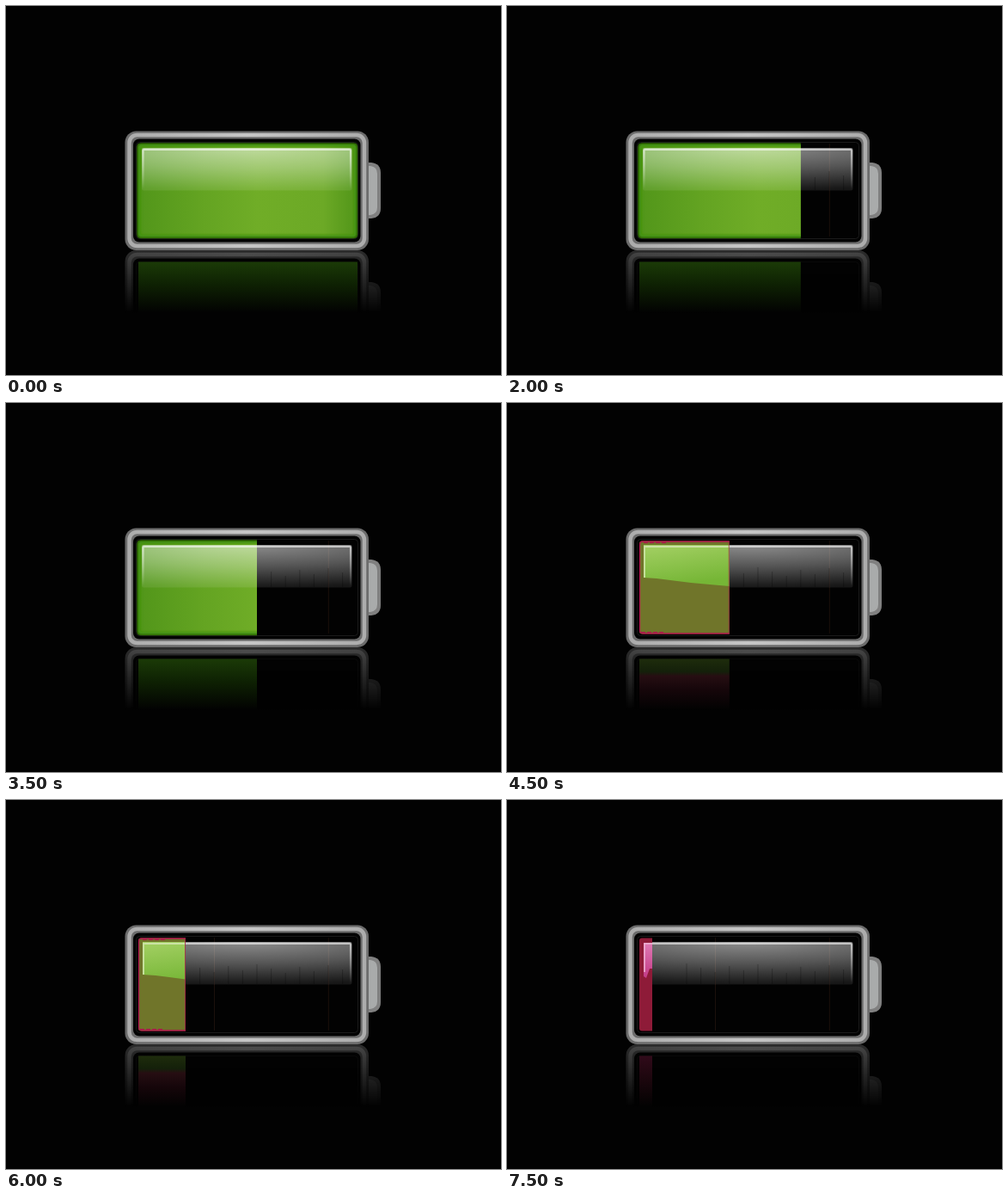
These frames come from a looping animation (576 by 429 pixels, 8 s). An HTML page:

```html
<!DOCTYPE html>
<html>
<head>
<meta charset="utf-8">
<style>
html, body { margin: 0; width: 100%; height: 100%; overflow: hidden; background: #020202; }
svg { display: block; width: 576px; height: 429px; }
</style>
</head>
<body>
<svg viewBox="0 0 576 429">
  <defs>
    <linearGradient id="green">
      <stop offset="0" stop-color="#52961a"/><stop offset=".3" stop-color="#64a422"/>
      <stop offset=".55" stop-color="#70ad27"/><stop offset=".85" stop-color="#6ca926"/>
      <stop offset="1" stop-color="#529619"/>
    </linearGradient>
    <linearGradient id="metal">
      <stop offset="0" stop-color="#acacac"/><stop offset=".5" stop-color="#c6c6c6"/><stop offset="1" stop-color="#acacac"/>
    </linearGradient>
    <radialGradient id="gloss" cx=".5" cy="0" r="1" gradientTransform="translate(-.3 0) scale(1.6 1)">
      <stop offset="0" stop-color="#fff" stop-opacity=".55"/>
      <stop offset=".5" stop-color="#fff" stop-opacity=".33"/>
      <stop offset="1" stop-color="#fff" stop-opacity=".08"/>
    </radialGradient>
    <linearGradient id="rim" x2="0" y2="1">
      <stop offset="0" stop-color="#fff" stop-opacity=".6"/>
      <stop offset="1" stop-color="#fff" stop-opacity="0"/>
    </linearGradient>
    <linearGradient id="lime" x2=".3" y2="1">
      <stop offset="0" stop-color="#a4d064"/><stop offset="1" stop-color="#76b636"/>
    </linearGradient>
    <linearGradient id="pink" x2="0" y2="1">
      <stop offset="0" stop-color="#e07ab4"/><stop offset="1" stop-color="#c23a86"/>
    </linearGradient>
    <linearGradient id="mirrorGreen" x2="0" y2="1">
      <stop offset="0" stop-color="#1b3a07"/><stop offset=".45" stop-color="#0e2103"/><stop offset="1" stop-color="#020202"/>
    </linearGradient>
    <linearGradient id="mirrorOlive" x2="0" y2="1">
      <stop offset="0" stop-color="#1e2c0c"/><stop offset=".25" stop-color="#14200a"/>
      <stop offset=".34" stop-color="#260e12"/><stop offset=".6" stop-color="#16060a"/><stop offset="1" stop-color="#020202"/>
    </linearGradient>
    <linearGradient id="mirrorRed" x2="0" y2="1">
      <stop offset="0" stop-color="#300a1a"/><stop offset=".5" stop-color="#1a060c"/><stop offset="1" stop-color="#020202"/>
    </linearGradient>
    <linearGradient id="fade" gradientUnits="userSpaceOnUse" x1="0" x2="0" y1="284" y2="357">
      <stop offset="0" stop-color="#fff" stop-opacity=".4"/><stop offset="1" stop-color="#fff" stop-opacity="0"/>
    </linearGradient>
    <mask id="fadeMask" maskUnits="userSpaceOnUse" x="130" y="284" width="320" height="80">
      <rect x="130" y="284" width="320" height="80" fill="url(#fade)"/>
    </mask>
    <filter id="soft"><feGaussianBlur stdDeviation=".7"/></filter>
    <filter id="glow"><feGaussianBlur stdDeviation="1.4"/></filter>
    <clipPath id="level"><rect id="levelBox" x="150" y="150" height="210"/></clipPath>
    <g id="shell">
      <path d="M415 182h10q11 1 11 12v41q0 11-11 12h-10z" fill="#808080" filter="url(#soft)"/>
      <path d="M415 186h9q8 1 8 9v39q0 8-8 9h-9z" fill="#a9abab" filter="url(#soft)"/>
      <g filter="url(#soft)">
        <rect x="138.500" y="145.500" width="283.500" height="138.500" rx="13" fill="#6c6c6c"/>
        <rect x="143.500" y="150" width="273.500" height="129" rx="9" fill="none" stroke="url(#metal)" stroke-width="4.500"/>
        <rect x="148" y="154.500" width="264.500" height="120" rx="7" fill="#020202"/>
      </g>
      <rect x="151.500" y="158.500" width="258" height="112" rx="4" fill="none" stroke="#1a1a1a"/>
    </g>
  </defs>

  <g mask="url(#fadeMask)"><use href="#shell" transform="matrix(1 0 0 -1 0 568)"/></g>
  <use href="#shell"/>
  <g id="stains" stroke="#22150f" stroke-width=".8"></g>

  <g class="mode" clip-path="url(#level)">
    <rect x="154" y="297.500" width="255" height="59" fill="url(#mirrorGreen)"/>
    <rect x="152.500" y="159.500" width="256.500" height="110.500" rx="4" fill="#2c6206" filter="url(#soft)"/>
    <rect x="154.500" y="161.500" width="252.500" height="106.500" rx="3" fill="url(#green)"/>
    <rect x="155" y="162" width="251.500" height="105.500" rx="3" fill="none" stroke="#3f920b" stroke-width="3" filter="url(#glow)"/>
  </g>

  <rect x="158" y="165" width="244.500" height="49.500" rx="2" fill="url(#gloss)"/>
  <rect x="159.500" y="166.800" width="241.500" height="47" rx="1.500" fill="none" stroke="url(#rim)" stroke-width="2.200" filter="url(#soft)"/>
  <g id="streaks" stroke="#000" stroke-opacity=".25"></g>

  <g class="mode" clip-path="url(#level)">
    <rect x="154" y="297.500" width="255" height="59" fill="url(#mirrorOlive)"/>
    <rect x="154" y="160.500" width="255" height="108" rx="3" fill="#70752a"/>
    <path d="M159 165H260V213L236 211 214 209 190 206 174 204 159 203z" fill="url(#lime)"/>
    <path d="M160 203V167H260" fill="none" stroke="#cbe3a4" stroke-width="1.800" filter="url(#soft)"/>
    <path d="M260 161H158Q154.500 161 154.500 165V264Q154.500 268 158 268H260" fill="none" stroke="#b0164e" stroke-width="1.300"/>
    <path d="M159 162.500H186M156 266.500H184" stroke="#b0164e" stroke-dasharray="5 2"/>
    <path id="edge" d="M0 161V268" stroke="#a31c46" stroke-opacity=".8"/>
  </g>
  <g class="mode" clip-path="url(#level)">
    <rect x="154" y="297.500" width="255" height="59" fill="url(#mirrorRed)"/>
    <rect x="154" y="160.500" width="255" height="108" rx="3" fill="#8e1b38"/>
    <path d="M159 166H196V196H166L162 207 159 205z" fill="url(#pink)"/>
    <path d="M160 200V167H196" fill="none" stroke="#f0b4d4" stroke-width="1.500" filter="url(#soft)"/>
  </g>
</svg>
<script>
const STEP = 500, STEPS = 16;
const $ = id => document.getElementById(id);
const modes = [...document.querySelectorAll('.mode')];
const edgeAt = i => i === 0 ? 411 : i < 13 ? 408.2 - 16.6 * i : 193 - 12 * (i - 13);
const modeAt = i => i < 9 ? 0 : i < 13 ? 1 : 2;
const line = (x, top, bottom) => `<path d="M${x} ${top}V${bottom}"/>`;
let shown = -1;

function draw(i) {
  const edge = edgeAt(i), mode = modeAt(i);
  $('levelBox').setAttribute('width', edge - 150);
  $('edge').setAttribute('transform', `translate(${edge - 0.5})`);
  modes.forEach((m, k) => m.style.display = k === mode ? '' : 'none');

  // Faint traces stay where earlier level edges stood.
  let streaks = '';
  for (let k = 1; k < Math.min(i, 13); k++) {
    streaks += line(edgeAt(k).toFixed(1), 190 + k * 7 % 12, 214);
  }
  $('streaks').innerHTML = streaks;
  $('stains').innerHTML = [2, 10].filter(k => k < i).map(k => line(edgeAt(k) + .3, 160, 268)).join('');
}

function tick(now) {
  const i = Math.floor(now / STEP) % STEPS;
  if (i !== shown) draw(shown = i);
  requestAnimationFrame(tick);
}
draw(shown = 0);
requestAnimationFrame(tick);
</script>
</body>
</html>
```
